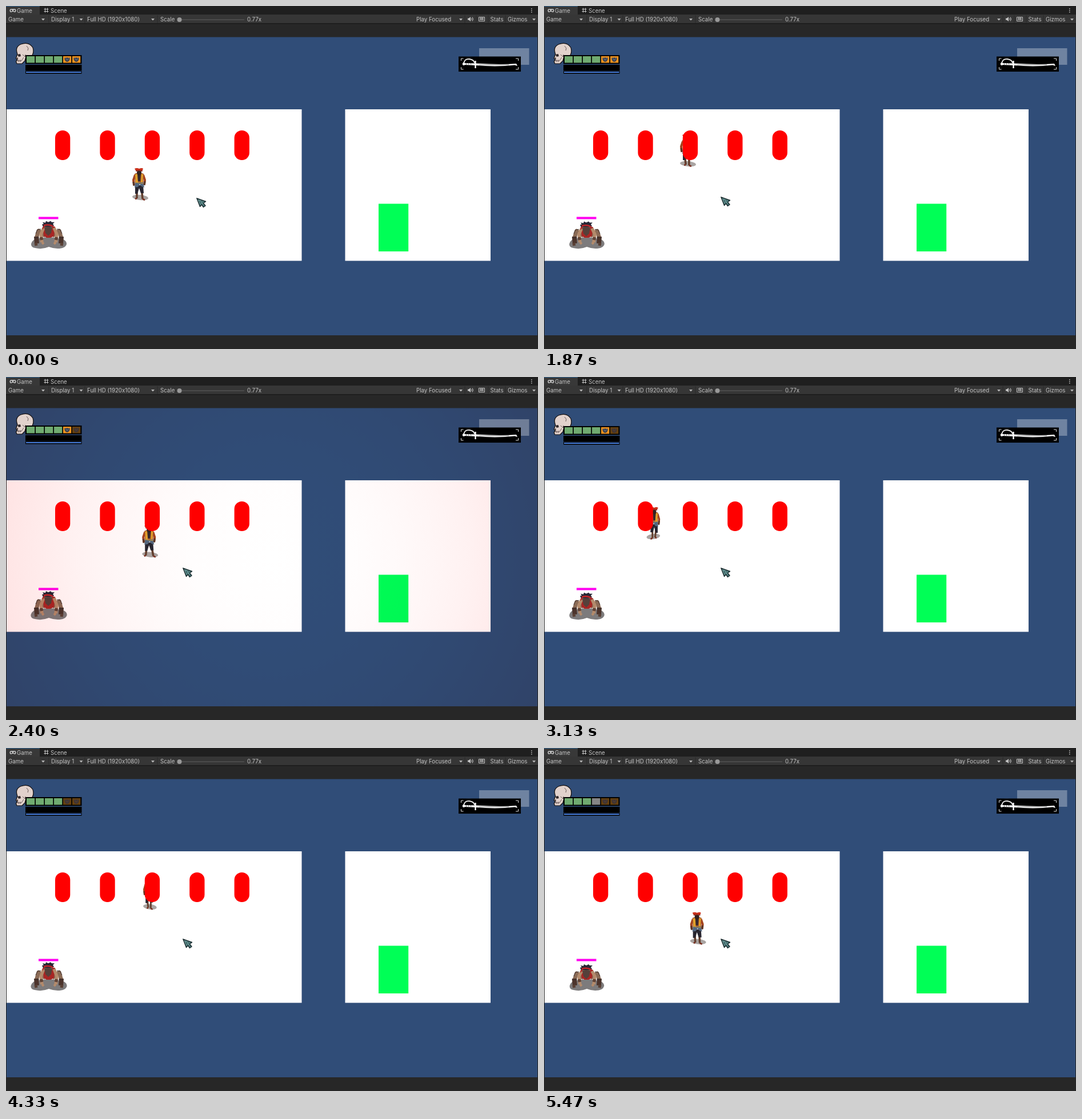
Write an HTML page with a canvas that moves like this. It is 931x601 px and loops after 5.54 s.

```html
<!DOCTYPE html>
<html lang="en">
<head>
<meta charset="utf-8">
<title>Game view</title>
<style>
html, body { margin: 0; width: 100%; height: 100%; overflow: hidden; background: #272727; }
canvas { display: block; width: 931px; height: 601px; }
</style>
</head>
<body>
<canvas id="stage" width="931" height="601"></canvas>
<script>
const ctx = document.getElementById('stage').getContext('2d');
const LOOP = 5540, STEPS = 83;
const HITS = [1872, 3080, 4300];

// Feet of the hero: time, x, y
const PATH = [
  [0, 233, 341], [600, 238, 336], [1200, 256, 307], [1500, 257, 294], [1870, 250, 282],
  [2130, 251, 306], [2400, 250, 320], [2700, 235, 312], [3070, 193, 285], [3470, 201, 294],
  [3700, 215, 299], [4200, 248, 286], [4330, 252, 282], [4600, 269, 298], [5000, 272, 324],
  [5470, 267, 348], [5540, 267, 349]
];

const clamp = v => Math.max(0, Math.min(1, v));
const mix = (a, b, u) => a + (b - a) * u;

function rect(color, x, y, w, h) {
  ctx.fillStyle = color;
  ctx.fillRect(x, y, w, h);
}
function fill(color, d) {
  ctx.fillStyle = color;
  ctx.fill(new Path2D(d));
}
function line(color, width, d) {
  ctx.strokeStyle = color;
  ctx.lineWidth = width;
  ctx.stroke(new Path2D(d));
}
function oval(color, x, y, rx, ry, turn = 0) {
  ctx.fillStyle = color;
  ctx.beginPath();
  ctx.ellipse(x, y, rx, ry, turn, 0, 7);
  ctx.fill();
}
function text(label, x, y) {
  ctx.fillStyle = '#c4c4c4';
  ctx.fillText(label, x, y);
}
function at(x, y, draw) {
  ctx.save();
  ctx.translate(x, y);
  draw();
  ctx.restore();
}
const arrow = x => fill('#b8b8b8', `M${x - 3} 22h6l-3 3.5z`);

function editor() {
  rect('#272727', 0, 0, 931, 601);
  rect('#1f1f1f', 0, 0, 931, 15);
  rect('#383838', 0, 0, 59, 15);
  rect('#2c5d87', 0, 0, 59, 1);
  rect('#363636', 0, 15, 931, 15);
  rect('#1b1b1b', 0, 30, 931, 1.5);
  ctx.font = '9.7px Inter, sans-serif';
  text('Game', 19, 11.5);
  text('Scene', 78, 11.5);
  line('#c4c4c4', 1, 'M68.5 3.5v8M72.5 3.5v8M66.5 5.5h8M66.5 9.5h8');
  fill('#c4c4c4', 'M9 5h6q2.500 0 2.500 3t-2.500 3l-2-1h-2l-2 1q-2.500 0-2.500-3t2.500-3z');
  oval('#383838', 9.5, 8, 1.4, 1.4);
  oval('#383838', 14.500, 8, 1.4, 1.4);
  for (const y of [4, 7, 10]) rect('#c4c4c4', 919, y, 1.5, 1.5);

  text('Game', 4, 27);
  text('Display 1', 79, 27);
  text('Full HD (1920x1080)', 142, 27);
  text('Scale', 270, 27);
  text('0.77x', 422, 27);
  text('Play Focused', 718, 27);
  text('Stats', 847.5, 27);
  text('Gizmos', 878, 27);
  [65, 131.5, 257, 796, 924].forEach(arrow);
  for (const x of [74.5, 137.5, 264.5, 802.5, 822.5, 843.5, 873.5]) rect('#2b2b2b', x, 16, 1, 14);
  rect('#5e5e5e', 304, 23.5, 113, 1);
  oval('#999', 303.500, 24, 4, 4);
  fill('#c4c4c4', 'M808 21.500h2l3-2.500v8l-3-2.500h-2z');
  line('#c4c4c4', 1, 'M814.500 21q1.500 2 0 4M816 19.500q3 3.500 0 7');
  line('#c4c4c4', 1, 'M827.500 19.500h10v7h-10zM829 22h7M829 24h7M831 20v4M834 20v4');
}

function hero(t) {
  const i = PATH.findIndex((p, n) => n && t <= p[0]);
  const a = PATH[i - 1], b = PATH[i];
  const u = (t - a[0]) / (b[0] - a[0]);
  const swing = t < 200 || t > 5430 ? 0 : 3 * Math.sin(t / 95);
  const left = t > 2420 && t < 3150;
  const profile = left || (t > 3150 && t < 4400);
  at(mix(a[1], b[1], u), mix(a[2], b[2], u), () => {
    ctx.scale((left ? -1 : 1) * (profile ? 0.85 : 1), 1);
    oval('#aaa5a3', 2, -5.5, 14, 4.5, 0.1);
    line('#63402f', 3.6, `M-3-24L${-4 + swing / 2}-13L${-4 + swing}-4`);
    line('#63402f', 3.6, `M3-24L${5 - swing / 2}-13L${6 - swing}-3`);
    line('#7b3021', 2.6, `M${-4 + swing}-4l-3 1M${6 - swing}-3l4 2`);
    fill('#282630', 'M-7-27H7L8-13H3L0-22-3-12H-7z');
    line('#a4431f', 4, 'M-7-45L-10-36L-9-27M7-45L10-36L9-28');
    line('#583626', 3, 'M-10-33L-9-26M10-34L9-27');
    fill('#a8572a', 'M-8-47Q0-51 8-47L7-30H-7z');
    fill('#e2a22a', 'M-7-46L-3-47-2-32-6-31zM7-46L4-47 3-32 6-32z');
    fill('#34282b', 'M-3-47H3L2-34H-2z');
    fill('#53677f', 'M-7-32L7-32 9-23 4-25 1-29-2-24-8-23z');
    line('#c69a3c', 1.2, 'M-7-32L7-30');
    oval('#30221f', 0, -49, 4, 5);
    fill('#c9301b', 'M-8-56Q-4-58 0-56Q5-58 7-56L5-51Q0-53-5-51z');
    line('#6e241c', 1, 'M-6-52Q0-54 6-52');
  });
}

function brute(t) {
  const breath = Math.cos((t - 2460) * Math.PI / 1000);
  at(75, 425, () => {
    ctx.save();
    ctx.scale(1 + 0.025 * breath, 1);
    fill('#7d7b7c', 'M-31-8Q-28-19-14-18Q0-22 15-18Q31-17 31-8Q29 0 15 0Q8 0 0-3Q-12 2-24-1Q-31-2-31-8z');
    ctx.restore();
    const lift = -2 * breath;
    const mirror = draw => {
      draw();
      ctx.save();
      ctx.scale(-1, 1);
      draw();
      ctx.restore();
    };
    mirror(() => {
      line('#8b6b56', 7, `M6-22L18 ${-31 + lift / 2}L22-18`);
      line('#4c342c', 8, 'M22-21L21-9');
      line('#5a4035', 5, 'M20-8L25-7');
      line('#3b2c2a', 1, `M14 ${-34 + lift / 2}l6 1 3 7M17-19h9`);
    });
    fill('#a82624', `M-11 ${-38 + lift}Q0-42 11 ${-38 + lift}L9-22 3-19H-4L-9-22z`);
    mirror(() => {
      line('#b48b6c', 5.5, `M9 ${-36 + lift}L14-25L12-11`);
      line('#604438', 5.500, 'M13.500-20L12.500-15');
      line('#b48b6c', 4, 'M12-11L9-8');
    });
    at(-1, lift, () => {
      oval('#a67c60', 0, -38, 7, 8);
      fill('#55403a', 'M-7-37Q0-39 7-37L5-27 0-22-5-27z');
      fill('#272735', 'M-9-38L-11-42-8-43-10-46-5-45-4-48 0-46 4-48 6-46 11-46 8-43 10-40 7-38z');
      line('#c32628', 2.6, 'M-8-40Q0-43 8-39');
      line('#b22528', 1.6, 'M-7-39L-10-34');
    });
  });
  rect('#ff00f0', 57, 369.5, 34.500, 4);
}

function scene(t) {
  rect('#304d78', 1, 54.5, 929, 522.5);
  rect('#fff', 1, 181, 516.500, 265.5);
  rect('#fff', 593.500, 181, 254.500, 265.5);
  rect('#00ff56', 652, 346.5, 52.200, 83.500);
  brute(t);
  hero(t);
  ctx.fillStyle = '#f00';
  for (let i = 0; i < 5; i++) {
    ctx.beginPath();
    ctx.roundRect(86 + i * 78.4, 218, 26.300, 52, 13);
    ctx.fill();
  }
}

// Red edges: multiply away green and blue, stronger with distance
function vignette(strength) {
  if (strength <= 0) return;
  const glow = ctx.createRadialGradient(465, 316, 0, 465, 316, 558);
  for (let i = 0; i <= 8; i++) {
    const rest = 255 * (1 - strength * 1.44 * (i / 8) ** 2);
    glow.addColorStop(i / 8, `rgb(255 ${rest} ${rest})`);
  }
  ctx.globalCompositeOperation = 'multiply';
  rect(glow, 1, 54.5, 929, 522.5);
  ctx.globalCompositeOperation = 'source-over';
}

function health(hits, shake) {
  at(0, shake, () => {
    const skull = 'M17.500 92L20 84Q15 72 26 67Q40 62 47 73Q50 82 44 89H35L33 96 28 101H19L17.500 97 20 94z';
    fill('#e2d2cc', skull);
    line('#15100f', 1.2, skull);
    fill('#302728', 'M20 85l5-1 1 4-4 1zM18 92l3-2v3z');
    line('#51413f', 0.8, 'M19 96h8l4-6M22 94v4M25 94v4M29 85l4 4 1-4M36 70l3 4-1 4');
    rect('#000', 34, 86, 98.500, 15.500);
    for (let i = 0; i < 6; i++) {
      const shield = i > 3;
      const lost = shield ? hits >= 6 - i : i === 3 && hits > 2;
      const x = 36 + i * 16;
      rect(shield ? (lost ? '#65400f' : '#f2941f') : (lost ? '#858585' : '#70ab70'), x, 88, 14.300, 11.5);
      if (shield) {
        fill(lost ? '#3f3435' : '#3c4250', `M${x + 2.500} 90l2 1 2.500-1 2.500 1 2-1v4q-1 3-4.500 4q-3.500-1-4.500-4z`);
        line(lost ? '#65482a' : '#8995a0', 0.8, `M${x + 4.500} 92l2.500 3 2.500-3`);
      }
    }
    rect('#000', 34, 103, 98.500, 10);
    rect('#000', 34, 113.500, 98.500, 5);
    rect('#477fe0', 35, 115, 96.500, 2);
  });
}

function weapon() {
  rect('rgba(255,255,255,.3)', 828, 74, 87.500, 29);
  rect('#000', 792, 88.500, 109, 26.500);
  line('#ddd', 1, 'M796.500 96v-4h4M892 92h4.500v4M796.500 107v4h4M892 111h4.500v-4');
  fill('#fff', 'M800 100L822 100.500Q865 103 893 101L895 105 890 103.500Q860 107 822 104L800 103z');
  line('#eee', 1.8, 'M801 100Q803 92 811 93Q819 94 820 100');
  line('#fff', 2.400, 'M821.500 96V109');
  oval('#fff', 801, 101.500, 2.200, 2.500);
  line('#444', 0.7, 'M805 100l1 3M809 100l1 3M813 100l1 3M828 103h52');
}

function cursor(t) {
  const u = clamp((t - 70) / 500);
  const ease = u * u * (3 - 2 * u);
  at(mix(333, 309, ease), mix(336, 334, ease), () => {
    const shape = 'M.8.8L16.500 6.500 12.500 9.500 16 14 12.500 16.500 9.500 12 6.500 15.500z';
    fill('#4b7778', shape);
    line('#192b2e', 1.4, shape);
    line('#79a3a0', 1, 'M3 3l4 9M5 4l7 3M8 7l4 5');
    line('#294c50', 0.8, 'M6 6l1 4M9 5l2 3');
  });
}

function draw(now) {
  const step = Math.floor((now % LOOP) * STEPS / LOOP);
  const t = step * LOOP / STEPS;
  const hits = HITS.filter(h => h <= t).length;
  const age = hits ? t - HITS[hits - 1] : Infinity;
  const strength = 0.38 * (1 - (age / 540) ** 2);
  const shake = age < 900 ? 19 * Math.exp(-age / 260) * Math.cos((age - 25) * 2 * Math.PI / 335) : 0;
  editor();
  scene(t);
  vignette(strength);
  health(hits, Math.round(shake));
  weapon();
  cursor(t);
  requestAnimationFrame(draw);
}
ctx.lineJoin = 'round';
requestAnimationFrame(draw);
</script>
</body>
</html>
```
